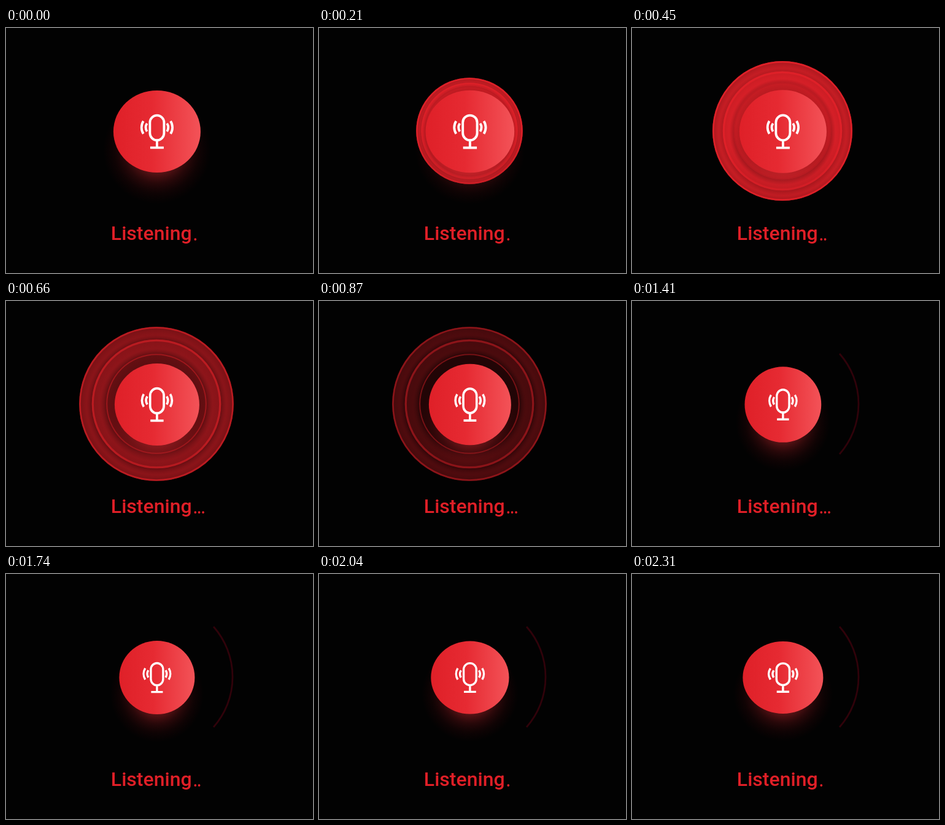
Recreate the animation shown at these times as an HTML page with a canvas. Size 500 by 400 pixels, loop 2340 ms.

```html
<!DOCTYPE html>
<html lang="en">
<head>
<meta charset="utf-8">
<title>Listening</title>
<style>
  html, body { margin: 0; width: 100%; height: 100%; overflow: hidden; background: #020202; }
  canvas { display: block; }
</style>
</head>
<body>
<canvas id="stage" width="500" height="400"></canvas>
<script>
const ctx = document.getElementById('stage').getContext('2d');
const LOOP = 2340, STEP = 30, TAU = Math.PI * 2;
const BUTTON = { x: 245.9, y: 169 };
const RINGS = { x: 245, y: 168 };

// Button half-width and half-height over time.
const WIDTH_KEYS = [[0, 71], [210, 72.3], [450, 71], [870, 67], [1110, 65], [1600, 60.7], [1740, 61.5], [2310, 65.5]];
const HEIGHT_KEYS = [[0, 67], [450, 67.7], [870, 66.2], [1110, 63.5], [1740, 60], [2310, 59]];

// Rings from the outside in: radii, red level at inner side, middle and edge, darkening power, border.
const RING_SET = [
  { from: 63, to: 125.8, reds: [180, 198, 168], power: 1, line: 2.6, glow: 1 },
  { from: 62.5, to: 105.3, reds: [172, 214, 200], power: 1.15, line: 3.2, glow: 1 },
  { from: 68, to: 81.8, reds: [180, 186, 200], power: 1.9, line: 2, glow: 0.85 }
];

const clamp01 = v => Math.max(0, Math.min(1, v));
const red = level => `rgb(${Math.round(level)},${Math.round(level * 0.145)},${Math.round(level * 0.18)})`;

function sample(keys, t) {
  const i = keys.findIndex(key => key[0] >= t);
  if (i < 0) return keys[keys.length - 1][1];
  if (i === 0) return keys[0][1];
  const [t0, a] = keys[i - 1], [t1, b] = keys[i];
  return a + (b - a) * (t - t0) / (t1 - t0);
}

function drawGlow(sx, sy) {
  ctx.save();
  ctx.translate(BUTTON.x, BUTTON.y + 30 * sy);
  ctx.scale(sx, sy);
  const glow = ctx.createRadialGradient(0, 0, 0, 0, 0, 88);
  glow.addColorStop(0, 'rgba(190,40,45,.75)');
  glow.addColorStop(0.42, 'rgba(190,40,45,.46)');
  glow.addColorStop(0.62, 'rgba(160,26,32,.24)');
  glow.addColorStop(0.8, 'rgba(130,14,20,.1)');
  glow.addColorStop(1, 'rgba(110,0,8,0)');
  ctx.fillStyle = glow;
  ctx.fillRect(-90, -90, 180, 180);
  ctx.restore();
}

function drawRings(t) {
  if (t < 60 || t >= 1110) return;
  const grow = clamp01(t / 555);
  const light = 1 - 0.6 * clamp01((t - 450) / 420);
  const radii = RING_SET.map(r => r.from + (r.to - r.from) * grow);
  ctx.save();
  ctx.globalAlpha = 1 - clamp01((t - 870) / 240);
  ctx.translate(RINGS.x, RINGS.y);
  RING_SET.forEach((ring, i) => {
    const r = radii[i], k = Math.pow(light, ring.power);
    const fill = ctx.createRadialGradient(0, 4 * grow, (radii[i + 1] || 62) - 3, 0, 0, r);
    ring.reds.forEach((level, n) => fill.addColorStop(n / 2, red(level * k)));
    ctx.beginPath();
    ctx.arc(0, 0, r, 0, TAU);
    ctx.fillStyle = fill;
    // Inner rings cast a soft shadow on the ring around them.
    ctx.shadowColor = `rgba(0,0,0,${i ? 1.1 - light : 0})`;
    ctx.shadowBlur = 9;
    ctx.fill();
    ctx.shadowColor = 'transparent';
    ctx.beginPath();
    ctx.arc(0, 0, r - ring.line / 2, 0, TAU);
    ctx.lineWidth = ring.line;
    ctx.strokeStyle = red(222 * Math.sqrt(light) * ring.glow);
    ctx.stroke();
  });
  ctx.restore();
}

function drawAfterglow(t) {
  if (t < 1080) return;
  const spread = Math.acos(93 / 124);
  ctx.beginPath();
  ctx.arc(RINGS.x, RINGS.y, 124, -spread, spread);
  ctx.lineWidth = 2.8;
  ctx.strokeStyle = '#30020a';
  ctx.stroke();
}

function drawMicrophone() {
  ctx.strokeStyle = '#fff';
  ctx.lineWidth = 3.8;
  ctx.beginPath();
  ctx.roundRect(-11.5, -26.3, 23, 40.5, 11.5);
  ctx.moveTo(0, 14.5);
  ctx.lineTo(0, 26);
  ctx.moveTo(-11, 26.4);
  ctx.lineTo(11, 26.4);
  ctx.stroke();
  for (const side of [0, Math.PI]) {
    const x = side ? -6 : 6;
    for (const r of [12.2, 19.2]) {
      ctx.beginPath();
      ctx.arc(x, -6.6, r, side - 0.57, side + 0.57);
      ctx.stroke();
    }
  }
}

function drawButton(sx, sy) {
  ctx.save();
  ctx.translate(BUTTON.x, BUTTON.y);
  ctx.scale(sx, sy);
  const fill = ctx.createLinearGradient(-71, 0, 71, 0);
  fill.addColorStop(0, '#df2028');
  fill.addColorStop(0.45, '#e62a32');
  fill.addColorStop(1, '#f35358');
  ctx.fillStyle = fill;
  ctx.beginPath();
  ctx.ellipse(0, 0, 71, 67, 0, 0, TAU);
  ctx.fill();
  drawMicrophone();
  ctx.restore();
}

function drawLabel(t) {
  const beat = Math.min(6, Math.floor(t / 330));
  const dots = 4 - Math.abs(3 - beat);
  ctx.fillStyle = '#e01f27';
  ctx.font = '500 32px Roboto, sans-serif';
  ctx.textAlign = 'left';
  ctx.fillText('Listening', 170.8, 346);
  ctx.textAlign = 'center';
  ctx.font = '30px Lato, sans-serif';
  for (let i = 0; i < dots; i++) ctx.fillText('.', 308.2 + 6.4 * i, 346.5);
}

function draw(now) {
  let t = Math.floor((now % LOOP) / STEP) * STEP;
  if (t < 60) t = 0;
  const sx = sample(WIDTH_KEYS, t) / 71, sy = sample(HEIGHT_KEYS, t) / 67;
  ctx.fillStyle = '#020202';
  ctx.fillRect(0, 0, 500, 400);
  drawRings(t);
  drawGlow(sx, sy);
  drawAfterglow(t);
  drawButton(sx, sy);
  drawLabel(t);
}

let start;
function tick(now) {
  start ??= now;
  draw(now - start);
  requestAnimationFrame(tick);
}
requestAnimationFrame(tick);
</script>
</body>
</html>
```
